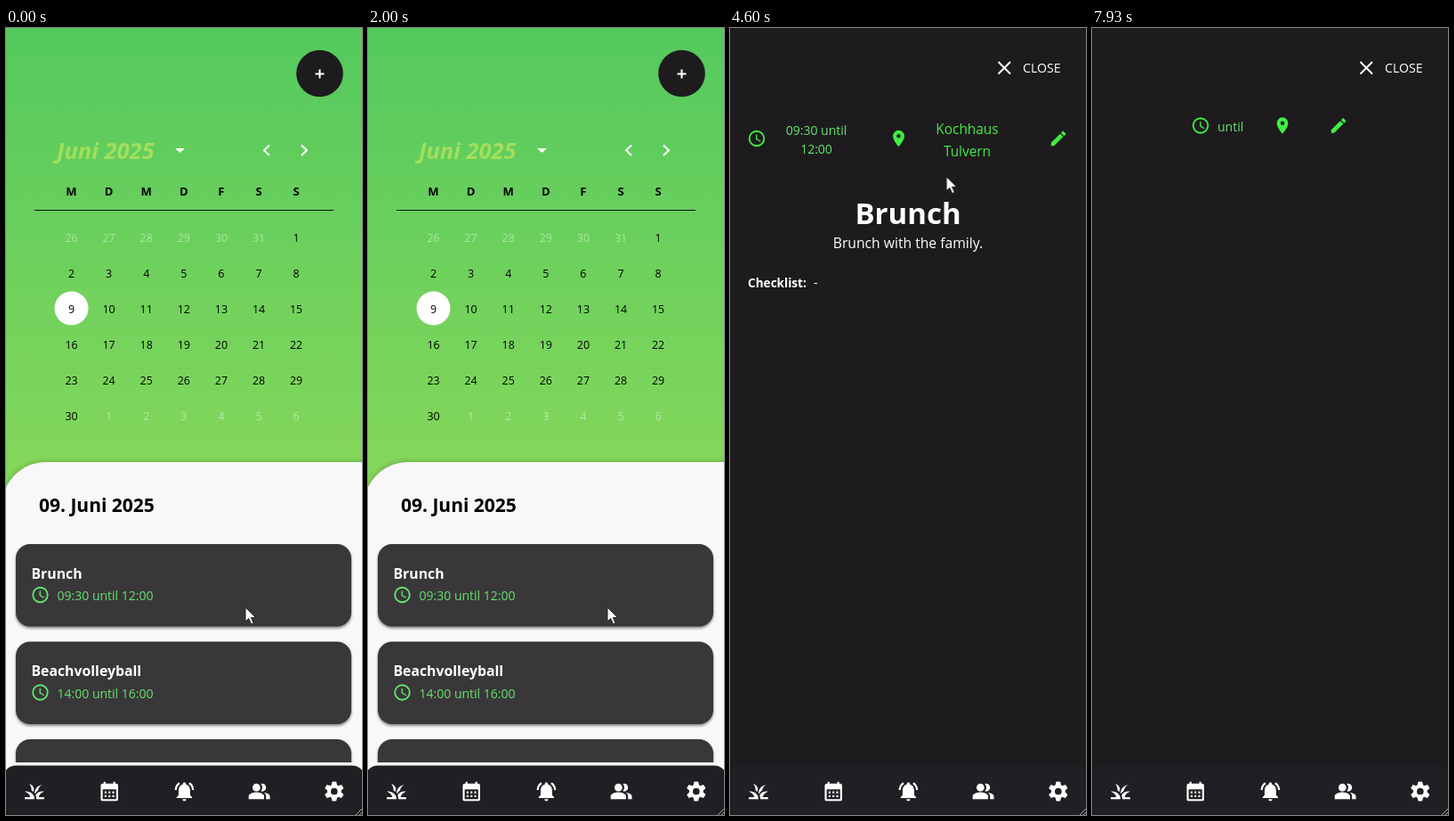
These frames come from a looping animation (400x883 px, 8000 ms). An HTML page:

```html
<!DOCTYPE html>
<html lang="de">
<head>
<meta charset="utf-8">
<title>Kalender</title>
<style>
html, body { margin: 0; width: 100%; height: 100%; overflow: hidden; background: #1d1b1e; }
svg { display: block; }
#stage { width: 100vw; height: 100vh; font-family: "Open Sans", "Noto Sans", sans-serif; }
.bold { font-weight: 700; }
.mid { text-anchor: middle; }
.day { font-size: 12.4px; text-anchor: middle; }
.other { fill: #fff; opacity: .45; }
.card rect { fill: #3a373a; filter: drop-shadow(0 2px 1.5px #0007); }
.card .name { font-size: 15.8px; font-weight: 700; fill: #fff; }
.time { font-size: 14px; }
.lime { fill: #62e56c; color: #62e56c; }
.vivid { fill: #40ee40; color: #40ee40; }

/* Visibility switches, 1% = 80ms */
.detail, .blank, .full, .list, .note, .arrows, .pointer, .arrow, .hand { animation: 8s step-end infinite; }
.detail { animation-name: detail; }
.blank { animation-name: blank; }
.full { animation-name: full; }
.list { animation-name: list; }
.note { animation-name: note; }
.arrows { animation-name: arrows; }
.pointer { animation-name: pointer; }
.arrow { animation-name: arrow; }
.hand { animation-name: hand; }
@keyframes detail { 0%, 67.5% { visibility: hidden } 33.6%, 98.3% { visibility: visible } }
@keyframes blank { 0%, 40% { visibility: hidden } 33.6%, 98.3% { visibility: visible } }
@keyframes full { 0%, 67.5% { visibility: hidden } 40% { visibility: visible } }
@keyframes list { 0%, 72.5% { visibility: visible } 67.5% { visibility: hidden } }
@keyframes note { 0%, 72.5% { visibility: hidden } 67.5% { visibility: visible } }
@keyframes arrows { 0%, 72.5% { opacity: 1 } 67.5% { opacity: .45 } }
@keyframes pointer { 0%, 44.1%, 74% { opacity: 1 } 33.6%, 67%, 98.3% { opacity: 0 } }
@keyframes arrow { 0%, 67%, 79%, 90.5% { opacity: 1 } 62.5%, 74%, 84.5% { opacity: 0 } }
@keyframes hand { 0%, 67%, 79%, 90.5% { opacity: 0 } 62.5%, 74%, 84.5% { opacity: 1 } }

.scroll { animation: scroll 8s linear infinite; }
@keyframes scroll {
  0%, 1.25% { transform: translateY(0) }
  10%, 11.9% { transform: translateY(-84px) }
  15.875% { transform: translateY(-57px) }
  21.6% { transform: translateY(-19px) }
  25%, 100% { transform: translateY(0) }
}
.move { animation: move 8s linear infinite; }
@keyframes move {
  0%, 44.1% { transform: translate(269px, 650px) }
  48% { transform: translate(236px, 550px) }
  54.1% { transform: translate(230px, 302px) }
  57.5% { transform: translate(243px, 167px) }
  65%, 77% { transform: translate(340px, 44px) }
  82% { transform: translate(330px, 240px) }
  87.5%, 89% { transform: translate(320px, 404px) }
  97%, 100% { transform: translate(290px, 772px) }
}
</style>
</head>
<body>
<svg id="stage" viewBox="0 0 400 883">
  <defs>
    <linearGradient id="green" x2="0" y2="1">
      <stop stop-color="#54c95e"/><stop offset="1" stop-color="#83d75b"/>
    </linearGradient>
    <clipPath id="window"><rect y="562" width="400" height="262"/></clipPath>
    <symbol id="clock" viewBox="0 0 24 24">
      <circle cx="12" cy="12" r="9" fill="none" stroke="currentColor" stroke-width="2"/>
      <path d="M12.5 7H11v6l5.25 3.15.75-1.23-4.5-2.67z"/>
    </symbol>
    <symbol id="pin" viewBox="0 0 24 24">
      <path d="M12 2a7 7 0 0 0-7 7c0 5.25 7 13 7 13s7-7.75 7-13a7 7 0 0 0-7-7zm0 9.5a2.5 2.5 0 0 1 0-5 2.5 2.5 0 0 1 0 5z"/>
    </symbol>
    <symbol id="pencil" viewBox="0 0 24 24">
      <path d="M3 17.25V21h3.75L17.8 9.94l-3.75-3.75zM20.7 7.04a1 1 0 0 0 0-1.41l-2.34-2.34a1 1 0 0 0-1.41 0l-1.83 1.83 3.75 3.75z"/>
    </symbol>
    <symbol id="grass" viewBox="0 0 24 24">
      <path d="M12 20H2v-2h5.75A9 9 0 0 0 2 12.26c.64-.16 1.3-.26 2-.26a8 8 0 0 1 8 8z"/>
      <path d="M22 12.26c-.64-.16-1.3-.26-2-.26a8 8 0 0 0-6.88 3.93c.5 1.1.87 2.6.87 4.07h8v-2h-5.75A9 9 0 0 1 22 12.26z"/>
      <path d="M15.64 11c.55-2.46 2.06-4.6 4.1-6A10 10 0 0 0 12 13.28l.8.96c.7-1.4 1.65-2.5 2.84-3.24zM11.42 8.85A8.5 8.5 0 0 0 6.7 4C8.2 6.5 9 8.6 9 11.13l2 1.3c.1-1.2.2-2.4.42-3.58z"/>
    </symbol>
    <symbol id="month" viewBox="0 0 24 24">
      <path d="M19 4h-1V2h-2v2H8V2H6v2H5a2 2 0 0 0-2 2v14a2 2 0 0 0 2 2h14a2 2 0 0 0 2-2V6a2 2 0 0 0-2-2zm0 16H5V10h14z"/>
      <path d="M7 13h10M7 17h10" stroke="currentColor" stroke-width="2" stroke-dasharray="2"/>
    </symbol>
    <symbol id="bell" viewBox="0 0 24 24">
      <path d="M7.58 4.08 6.15 2.65A10.5 10.5 0 0 0 2 10.5h2a8.5 8.5 0 0 1 3.58-6.42zM20 10.5h2a10.5 10.5 0 0 0-4.15-7.85l-1.42 1.43A8.5 8.5 0 0 1 20 10.5z"/>
      <path d="M18 11c0-3.07-1.64-5.64-4.5-6.32V4a1.5 1.5 0 0 0-3 0v.68C7.63 5.36 6 7.92 6 11v5l-2 2v1h16v-1l-2-2zM10 20a2 2 0 0 0 4 0z"/>
    </symbol>
    <symbol id="people" viewBox="0 0 24 24">
      <circle cx="9" cy="8" r="4"/>
      <path d="M9 13c-2.67 0-8 1.34-8 4v3h16v-3c0-2.66-5.33-4-8-4zM16.67 13.13C18 14 19 15.3 19 17v3h4v-3c0-2.18-3.57-3.47-6.33-3.87zM15 12a4 4 0 0 0 0-8c-.47 0-.9.1-1.33.24a6 6 0 0 1 0 7.52c.42.14.86.24 1.33.24z"/>
    </symbol>
    <path id="tooth" d="M10.1 2.2h3.8l.9 4.2H9.2z" stroke="currentColor" stroke-width=".6" stroke-linejoin="round"/>
    <symbol id="gear" viewBox="0 0 24 24">
      <circle cx="12" cy="12" r="5.4" fill="none" stroke="currentColor" stroke-width="3.7"/>
      <use href="#tooth"/>
      <use href="#tooth" transform="rotate(60 12 12)"/>
      <use href="#tooth" transform="rotate(120 12 12)"/>
      <use href="#tooth" transform="rotate(180 12 12)"/>
      <use href="#tooth" transform="rotate(240 12 12)"/>
      <use href="#tooth" transform="rotate(300 12 12)"/>
    </symbol>
  </defs>

  <rect width="400" height="560" fill="#83d75b"/>
  <rect width="400" height="490" fill="url(#green)"/>
  <circle cx="352.5" cy="51" r="26.3" fill="#1d1b1e"/>
  <path d="M347.5 51.5h10M352.5 46.5v10" stroke="#fff" stroke-width="2"/>
  <text x="57" y="147" font-size="25.5" font-style="italic" class="bold" fill="#a2df5d">Juni 2025</text>
  <path d="M190 135h11l-5.5 5z" fill="#fff"/>
  <path class="arrows" d="M296 131.5l-6 5.7 6 5.7M332 131.5l6 5.7-6 5.7" fill="none" stroke="#fff" stroke-width="2"/>
  <path d="M32 204.5h336" stroke="#111"/>
  <circle cx="73.5" cy="314.5" r="19" fill="#fff"/>
  <g id="days"></g>

  <rect x="-5" y="487" width="460" height="450" rx="50" fill="#f9f7fa" style="filter:drop-shadow(0 0 3px #0004)"/>
  <text x="37" y="543" font-size="21" class="bold">09. Juni 2025</text>
  <text x="28" y="582" font-size="16.2" fill="#868487" class="note">No MeetUps on this day</text>
  <g class="list" clip-path="url(#window)"><g class="scroll" id="cards"></g></g>

  <g class="detail">
    <rect width="400" height="883" fill="#1d1b1e"/>
    <path d="M301.5 38l13.5 13.5M315 38l-13.5 13.5" stroke="#fff" stroke-width="2"/>
    <text x="329" y="50" font-size="14.1" fill="#fff">CLOSE</text>
  </g>
  <g class="blank vivid">
    <use href="#clock" x="111" y="98.5" width="22" height="22"/>
    <text x="141" y="115.5" class="time lime">until</text>
    <use href="#pin" x="203" y="98.5" width="22" height="22"/>
    <use href="#pencil" x="266" y="98.5" width="22" height="22"/>
  </g>
  <g class="full">
    <g class="vivid">
      <use href="#clock" x="19" y="113" width="22" height="22"/>
      <use href="#pin" x="178.500" y="113" width="22" height="22"/>
      <use href="#pencil" x="358" y="113" width="22" height="22"/>
      <g class="time mid lime"><text x="97" y="120">09:30 until</text><text x="97" y="141">12:00</text></g>
      <g class="mid" font-size="15.4"><text x="266.500" y="118.500">Kochhaus</text><text x="266.500" y="144">Tulvern</text></g>
    </g>
    <g fill="#fff">
      <text x="200" y="220" font-size="33" class="bold mid">Brunch</text>
      <text x="200" y="247" font-size="15.7" class="mid">Brunch with the family.</text>
      <text x="20" y="291" font-size="13.6" class="bold">Checklist:</text>
      <text x="94" y="291" font-size="14">-</text>
    </g>
  </g>

  <rect x="-3" y="827.5" width="406" height="80" rx="14" fill="#211f23"/>
  <g id="nav" fill="#fff" color="#fff"></g>
  <path d="M393 883l7-7M397 883l3-3" stroke="#aaa" stroke-width="1"/>

  <g class="pointer"><g class="move" fill="#fff" stroke="#222" stroke-width="1" stroke-linejoin="round">
    <path class="arrow" d="M0 0v16l3.700-3.500 2.800 6.300 2.700-1.200-2.800-6.100h5.100z"/>
    <path class="hand" d="M-1.500 1.500a1.700 1.700 0 0 1 3.400 0v7c.5-1.600 3.200-1.400 3.400.3.700-1.300 3-.9 3.100.7 1-1 2.900-.4 2.900 1.300v4.700c0 2-1.300 3.200-1.300 5.700v1.600H1.500v-1.600c0-1.800-4.300-5.500-6.800-9.300-.9-1.400.8-2.600 2.200-1.300l1.600 1.600z"/>
  </g></g>
</svg>
<script>
const fill = (id, html) => { document.getElementById(id).innerHTML = html; };
const colX = i => 73.5 + 42.1 * i;

const heads = [..."MDMDFSS"].map((d, i) =>
  `<text class="day bold" style="font-size:13px" x="${colX(i)}" y="188">${d}</text>`);
const days = Array.from({ length: 42 }, (_, i) => {
  const n = i - 5;
  const other = n < 1 || n > 30;
  const label = n < 1 ? n + 31 : n > 30 ? n - 30 : n;
  return `<text class="day${other ? " other" : ""}" x="${colX(i % 7)}" y="${239.5 + 40 * Math.floor(i / 7)}">${label}</text>`;
});
fill("days", heads.concat(days).join(""));

const meetups = [
  ["Brunch", "09:30 until 12:00"],
  ["Beachvolleyball", "14:00 until 16:00"],
  ["Dinner Date", "19:00 until 21:30"],
];
fill("cards", meetups.map(([name, time], i) => `
  <g class="card" transform="translate(11 ${579 + 109.5 * i})">
    <rect width="377" height="92.5" rx="16"/>
    <text class="name" x="17.5" y="38.5">${name}</text>
    <g class="lime"><use href="#clock" x="16.500" y="46" width="22" height="22"/>
    <text class="time" x="46.500" y="63">${time}</text></g>
  </g>`).join(""));

fill("nav", ["grass", "month", "bell", "people", "gear"].map((icon, i) =>
  `<use href="#${icon}" x="${19 + 84.2 * i}" y="843.5" width="26" height="26"/>`).join(""));
</script>
</body>
</html>
```
